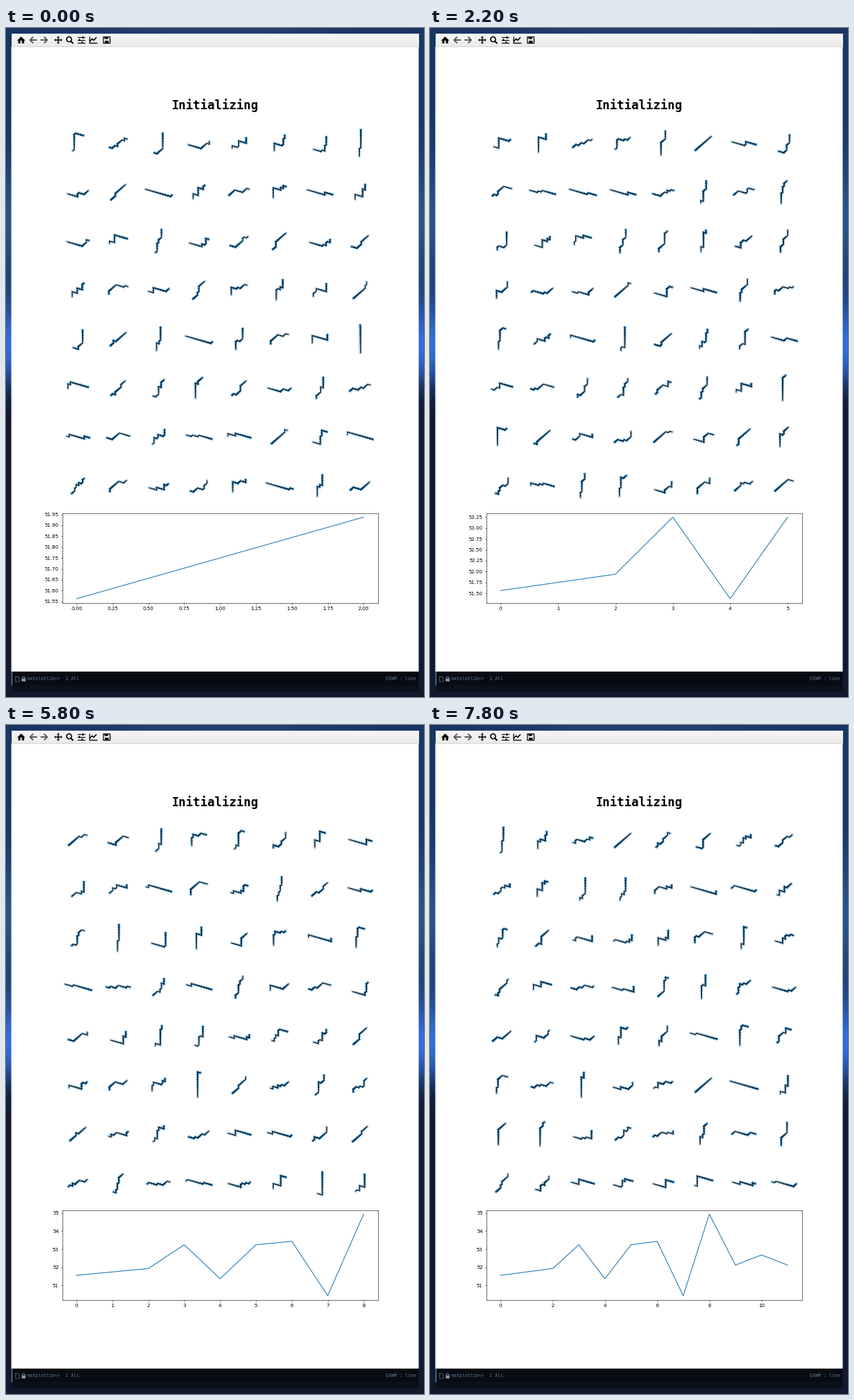
Recreate the animation shown at these times as a matplotlib script. Size 592x947 px, loop 8 s.

```python
import numpy as np
import matplotlib.pyplot as plt
from matplotlib.animation import FuncAnimation
from matplotlib.collections import LineCollection
from matplotlib.patches import Circle, Polygon, Rectangle

W, H, DPI = 592, 947, 50
FRAMES, STEP_MS = 80, 100
FIRST_MS, PERIOD_MS = 350, 915          # first update and time between updates
PT = 72 / DPI                           # points per pixel

# Mean scores move in steps of 3/16
SCORES = 51.5625 + 3 / 16 * np.array([0, 1, 2, 9, -1, 9, 10, -6, 18, 3, 6, 3])

# Window canvas with a grid of 10 rows by 8 columns
LEFT, TOP, CW, CH = 7.5, 26, 577, 885
RIGHT, BOTTOM = LEFT + CW, TOP + CH
GX, GY = LEFT + .125 * CW, TOP + .12 * CH
CELL_W, CELL_H = .775 * CW / 9.4, .77 * CH / 11.8

# Unit lattice steps seen at the usual 3D view angles; y points down on screen
LINKS, LINK_PX = 11, 4.1
ELEV, AZIM = np.radians([30, -60])
ACROSS = np.array([-np.sin(AZIM), np.cos(AZIM), 0])
UP = np.array([-np.sin(ELEV) * np.cos(AZIM), -np.sin(ELEV) * np.sin(AZIM), np.cos(ELEV)])
NEAR = np.cross(ACROSS, UP)
STEPS = LINK_PX * np.column_stack([ACROSS, -UP])
BLUE = (31 / 255, 119 / 255, 180 / 255)

fig = plt.figure(figsize=(W / DPI, H / DPI), dpi=DPI)
ax = fig.add_axes([0, 0, 1, 1])


def rect(x0, y0, x1, y1, color="black"):
    ax.add_patch(Rectangle((x0, y0), x1 - x0, y1 - y0, fc=color, lw=0, snap=False))


def poly(points, color="black"):
    ax.add_patch(Polygon(points, fc=color, lw=0))


def stroke(xs, ys, color="black", px=1.3):
    ax.plot(xs, ys, color=color, lw=px * PT, solid_capstyle="butt")


def wallpaper():
    """Night sky over a bright blue horizon, with dark woods below."""
    y = np.arange(H)[:, None, None]
    x = np.linspace(-1, 1, 60)[None, :, None]
    sky, glow, mist, wood = (np.array(c) / 255 for c in
                             [(24, 54, 100), (28, 56, 118), (16, 30, 34), (17, 25, 46)])
    img = (sky + glow * np.exp(-((y - 450) / 60) ** 2)
           + mist * np.exp(-((y - 270) / 80) ** 2)
           + .05 * np.exp(-3 * x ** 2) * (y < 50))
    dark = 1 / (1 + np.exp(-(y - 510) / 14))
    ax.imshow(img * (1 - dark) + wood * dark, extent=(0, W, H, 0), aspect="auto")


def arrow_icon(x, way):
    stroke([x - way * 5, x + way * 4], [17, 17], "#555555", 1.9)
    stroke([x, x + way * 4.4, x], [12.6, 17, 21.4], "#555555", 1.9)


def toolbar():
    shade = np.linspace(.965, .92, 18)[:, None, None] * np.ones(3)
    ax.imshow(shade, extent=(LEFT, RIGHT, TOP, 8), aspect="auto")
    stroke([LEFT, RIGHT], [25.8, 25.8], "#c8c8c8", .7)
    # home
    poly([(21.5, 12), (27.2, 17.8), (15.8, 17.8)])
    rect(17.4, 17.2, 20.4, 21.8)
    rect(22.6, 17.2, 25.6, 21.8)
    arrow_icon(38.5, -1)
    arrow_icon(54, 1)
    # pan
    for dx, dy in [(1, 0), (-1, 0), (0, 1), (0, -1)]:
        a, b = 74 + 3.4 * dx, 17 + 3.4 * dy
        stroke([74, a], [17, b], px=1.5)
        poly([(74 + 5.8 * dx, 17 + 5.8 * dy),
              (a + 2.2 * dy, b + 2.2 * dx), (a - 2.2 * dy, b - 2.2 * dx)])
    # zoom
    ax.add_patch(Circle((89.3, 16), 3.5, fc="none", ec="black", lw=1.6 * PT))
    stroke([91.8, 95.2], [18.6, 22], px=2)
    # sliders
    for k, knob in enumerate([109, 104, 108]):
        y = 13.4 + 3.6 * k
        stroke([101, 112], [y, y], px=1.1)
        rect(knob - 1, y - 1.4, knob + 1, y + 1.4)
    # plot
    stroke([117.6, 117.6, 129], [12, 21.4, 21.4])
    stroke([119, 122, 124.2, 128.2], [18.6, 15.3, 17.4, 13.2], px=1.6)
    # save
    rect(137.4, 12, 148, 22.2)
    rect(138.6, 13.2, 146.8, 21, "#eeeeee")
    rect(139.6, 13, 144.6, 15.6)
    rect(140, 18, 145.4, 21)


def modeline():
    grey, pale = "#5f7787", "#8795a1"
    rect(LEFT, BOTTOM, RIGHT, 930.5, "#070b12")
    rect(LEFT, 930.5, RIGHT, 939, "#0b1019")
    rect(LEFT, BOTTOM, 9.2, 930.5, "#4d6f94")
    stroke([13.6, 17, 19, 19, 13.6, 13.6], [918, 918, 920, 925, 925, 917.6], grey, .7)
    rect(22.2, 920.8, 27.8, 925, pale)
    ax.add_patch(Circle((25, 920), 1.8, fc="none", ec=pale, lw=.9 * PT))
    font = dict(family="DejaVu Sans Mono", size=9.4, va="baseline", color=grey)
    ax.text(30.3, 923.4, "matplotlib<>  1 All", **font)
    ax.text(580.3, 923.4, "EXWM : line", ha="right", **font)


def walk(rng):
    """Directions of one chain: uneven weights, with a habit of going straight."""
    weights = rng.dirichlet([1.7] * 3)
    dirs = [rng.choice(3, p=weights)]
    while len(dirs) < LINKS:
        turn = rng.random() > .25
        dirs.append(rng.choice(3, p=weights) if turn else dirs[-1])
    return np.array(dirs)


def population(gen):
    rng = np.random.default_rng(700 + gen)
    paths, alphas = [], []
    for k in range(64):
        row, col = divmod(k, 8)
        dirs = walk(rng)
        mid = np.array([GX + CELL_W * (.5 + 1.2 * col) - 1.5,
                        GY + CELL_H * (.5 + 1.2 * row) + 2])
        path = np.vstack([[0, 0], STEPS[dirs].cumsum(axis=0)])
        paths.append(mid + path - path[-1] / 2)
        depth = np.append(0, NEAR[dirs].cumsum())
        alphas.append(.3 + .7 * (depth - depth.min()) / np.ptp(depth))
    return paths, np.concatenate(alphas)


wallpaper()
rect(LEFT, TOP, RIGHT, BOTTOM, "white")
toolbar()
modeline()
ax.text(296, 115, "Initializing", family="DejaVu Sans Mono", weight="bold",
        size=24.7, ha="center", va="baseline")
ax.set(xlim=(0, W), ylim=(H, 0))
ax.axis("off")

dots = ax.scatter([], [], s=20, linewidths=1, zorder=4)
chains = LineCollection([], colors="black", linewidths=1.5, zorder=5)
ax.add_collection(chains, autolim=False)

chart_bottom = TOP + .89 * CH
chart = fig.add_axes([GX / W, 1 - chart_bottom / H, .775 * CW / W, 2.2 * CELL_H / H])
curve, = chart.plot([], [], color=BLUE)


def draw(frame):
    t = frame * STEP_MS
    gen = 2 if t < FIRST_MS else 3 + int((t - FIRST_MS) // PERIOD_MS)
    paths, alphas = population(gen)
    chains.set_segments(paths)
    dots.set_offsets(np.concatenate(paths))
    dots.set_color([(*BLUE, a) for a in alphas])
    curve.set_data(range(gen + 1), SCORES[:gen + 1])
    chart.relim()
    chart.autoscale_view()
    return chains, dots, curve


anim = FuncAnimation(fig, draw, frames=FRAMES, interval=STEP_MS,
                     init_func=lambda: draw(0), repeat=True, repeat_delay=0)
plt.show()
```
